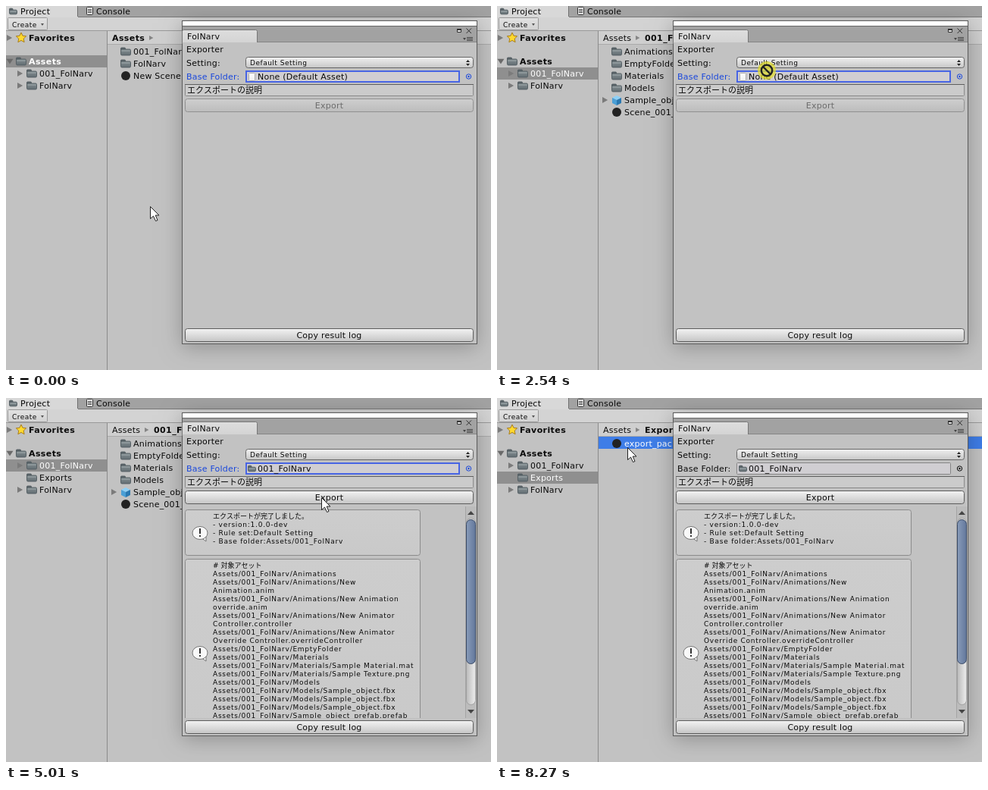
Animation, 640 px wide and 480 px high, one loop 9280 ms. Source, as an HTML page with a canvas:

```html
<!DOCTYPE html>
<html lang="en">
<head>
<meta charset="utf-8">
<style>
html, body { margin: 0; width: 640px; height: 480px; overflow: hidden; background: #c2c2c2; }
canvas { display: block; }
</style>
</head>
<body>
<canvas id="stage" width="640" height="480"></canvas>
<script>
const c = document.getElementById('stage').getContext('2d');
const LOOP = 9280;
const PACK = 'FolNarv', BASE = '001_' + PACK, ROOT = 'Assets/' + BASE + '/';
const FAMILY = '"DejaVu Sans", "Noto Sans CJK JP", sans-serif';
const INK = '#0a0a0a', BLUE = '#3e7de7', GREY = '#8f8f8f';

// Pointer moves: start, end, steps, target x, target y
const MOVES = [
  [300, 760, 7, 82, 78], [1010, 1240, 4, 82, 86], [1620, 1700, 2, 77, 86],
  [2006, 2540, 8, 356, 85], [2620, 2770, 3, 374, 92], [3540, 3850, 5, 416, 131],
  [5710, 5790, 2, 415, 142], [5940, 6790, 12, 77, 106], [7570, 7950, 6, 172, 65]
];
const PRESSES = [[1390, 1470], [1930, 3080], [4550, 4630], [7110, 7250], [8200, 8270]];

const SUMMARY = ['エクスポートが完了しました。', '- version:1.0.0-dev',
  '- Rule set:Default Setting', '- Base folder:Assets/' + BASE];
const ASSETS = ['# 対象アセット', ROOT + 'Animations', ROOT + 'Animations/New', 'Animation.anim',
  ROOT + 'Animations/New Animation', 'override.anim', ROOT + 'Animations/New Animator',
  'Controller.controller', ROOT + 'Animations/New Animator',
  'Override Controller.overrideController', ROOT + 'EmptyFolder', ROOT + 'Materials',
  ROOT + 'Materials/Sample Material.mat', ROOT + 'Materials/Sample Texture.png', ROOT + 'Models',
  ...Array(3).fill(ROOT + 'Models/Sample_object.fbx'), ROOT + 'Sample_object_prefab.prefab'];

const within = (t, a, b) => t >= a && t < b;

function pointer(t) {
  let x = 190, y = 264;
  for (const [start, end, steps, tx, ty] of MOVES) {
    if (t < start) break;
    const k = Math.min(steps, Math.floor((t - start) / (end - start) * (steps - 1) + 1.001)) / steps;
    const e = (1 - Math.cos(Math.PI * k)) / 2;
    x += (tx - x) * e;
    y += (ty - y) * e;
  }
  return [Math.round(x), Math.round(y)];
}

function rect(x, y, w, h, color) {
  c.fillStyle = color;
  c.fillRect(x, y, w, h);
}

function box(x, y, w, h, r, from, to, stroke, sideways = false) {
  const g = sideways ? c.createLinearGradient(x, 0, x + w, 0) : c.createLinearGradient(0, y, 0, y + h);
  g.addColorStop(0, from);
  g.addColorStop(1, to);
  c.beginPath();
  c.roundRect(x + .5, y + .5, w - 1, h - 1, r);
  c.fillStyle = g;
  c.fill();
  if (stroke) {
    c.strokeStyle = stroke;
    c.lineWidth = 1;
    c.stroke();
  }
}

function poly(points, color, stroke) {
  c.beginPath();
  for (let i = 0; i < points.length; i += 2) c.lineTo(points[i], points[i + 1]);
  c.closePath();
  c.fillStyle = color;
  c.fill();
  if (stroke) {
    c.strokeStyle = stroke;
    c.lineWidth = 1;
    c.stroke();
  }
}

function disc(x, y, r, color) {
  c.beginPath();
  c.arc(x, y, r, 0, 7);
  c.fillStyle = color;
  c.fill();
}

function ring(x, y, r, color, width) {
  c.beginPath();
  c.arc(x, y, r, 0, 7);
  c.strokeStyle = color;
  c.lineWidth = width;
  c.stroke();
}

function line(x1, y1, x2, y2, color, width = 1) {
  c.beginPath();
  c.moveTo(x1, y1);
  c.lineTo(x2, y2);
  c.strokeStyle = color;
  c.lineWidth = width;
  c.stroke();
}

function write(s, x, y, font, spacing, color, align = 'left') {
  c.font = font + ' ' + FAMILY;
  c.letterSpacing = (/[ぁ-ヿ]/.test(s) ? 0 : spacing) + 'px';
  c.textAlign = align;
  c.fillStyle = color;
  c.fillText(s, x, y);
}
const text = (s, x, y, color = INK, align) => write(s, x, y, '11px', .22, color, align);
const bold = (s, x, y, color = INK) => write(s, x, y, 'bold 11px', .4, color);
const small = (s, x, y, spacing = .5) => write(s, x, y, '9px', spacing, INK);

const right = (x, y, s = 4, color = '#7b7b7b') => poly([x, y - s, x + s * 1.8, y, x, y + s], color);
const down = (x, y, s, color) => poly([x - s, y - s / 2, x + s, y - s / 2, x, y + s], color);

function folder(x, y, w = 14) {
  const h = w * .78;
  box(x, y - h / 2, w * .5, h * .6, 1, '#566065', '#566065', '#566065');
  box(x, y - h / 2 + 2, w, h - 2, 1.5, '#879195', '#606b70', '#566065');
  line(x + 1.5, y - h / 2 + 4.5, x + w - 1.5, y - h / 2 + 4.5, '#9da7aa');
}

function star(x, y) {
  const pts = [];
  for (let i = 0; i < 10; i++) {
    const r = i % 2 ? 3.4 : 7, a = i * Math.PI / 5;
    pts.push(x + r * Math.sin(a), y - r * Math.cos(a));
  }
  poly(pts, '#ffd92e', '#a97d1c');
}

function cube(x, y) {
  poly([x, y - 6, x + 6, y - 3, x, y, x - 6, y - 3], '#8fd0f5');
  poly([x - 6, y - 3, x, y, x, y + 7, x - 6, y + 4], '#4a9fd6');
  poly([x + 6, y - 3, x, y, x, y + 7, x + 6, y + 4], '#2b78b0');
}

function button(y, label, enabled, pressed) {
  const [top, bottom] = pressed ? ['#9b9b9b', '#b4b4b4'] : enabled ? ['#f4f4f4', '#c4c4c4'] : ['#cfcfcf', '#bcbcbc'];
  box(236, y, 381, 18, 3, top, bottom, enabled ? '#5c5c5c' : '#919191');
  text(label, 426.5, y + 13, enabled ? INK : '#6c6c6c', 'center');
}

function drawTree(t) {
  const exported = t >= 5010;
  const rows = ['Assets', BASE, ...(exported ? ['Exports'] : []), PACK];
  const selected = t < 1390 ? 0 : t < 7110 ? 1 : 2;
  const active = within(t, 1390, 2310) || within(t, 7110, 8200);
  right(1, 42);
  star(20, 42);
  bold('Favorites', 30, 46);
  rows.forEach((name, i) => {
    const y = 73 + i * 16, color = i === selected ? '#fff' : INK;
    if (i === selected) rect(0, y - 8, 133, 16, active ? BLUE : GREY);
    if (i === 0) {
      down(5, y - 1, 4.5, '#6a6a6a');
      folder(13, y);
      bold(name, 30, y + 4, color);
    } else {
      if (name !== 'Exports') right(15, y);
      folder(27, y);
      text(name, 44, y + 4, color);
    }
  });
}

function drawList(t) {
  const place = t < 1470 ? '' : t < 7190 ? BASE : 'Exports';
  (place ? text : bold)('Assets', 140, 46);
  right(place ? 183 : 189, 42, 3, '#858585');
  if (place) bold(place, 195, 46);

  const picked = t >= 8200;
  if (picked) rect(134, 51, 506, 16, BLUE);
  const rows = !place ? [BASE, PACK, 'New Scene']
    : place === BASE ? ['Animations', 'EmptyFolder', 'Materials', 'Models', 'Sample_object', 'Scene_' + BASE]
    : ['export_package'];
  rows.forEach((name, i) => {
    const y = 60 + i * 16;
    if (name === 'Sample_object') {
      right(139, y);
      cube(158, y);
    } else if (/Scene|export/.test(name)) disc(158, y, 6, '#222');
    else folder(151, y);
    text(name, 168, y + 4, picked ? '#fff' : INK);
  });
}

function drawProject(t) {
  rect(0, 0, 640, 480, '#c2c2c2');
  rect(0, 0, 640, 15, '#a2a2a2');
  rect(0, 0, 95, 15, '#d8d8d8');
  rect(94, 0, 1, 14, '#707070');
  rect(95, 14, 545, 1, '#777');
  folder(4, 7, 11);
  text('Project', 19, 11);
  box(106, 1, 9, 11, 1, '#eee', '#ddd', '#333');
  for (const y of [4, 6, 8]) rect(108, y, 5, 1, '#444');
  text('Console', 119, 11);

  rect(0, 15, 640, 17, '#d3d3d3');
  rect(0, 32, 640, 1, '#999');
  box(2, 15, 53, 17, 1, '#e2e2e2', '#d2d2d2', '#999');
  small('Create', 8, 28);
  down(48, 24, 2, '#555');
  rect(134, 33, 506, 18, '#cfcfcf');
  rect(134, 50, 506, 1, '#aaa');
  drawTree(t);
  drawList(t);
  rect(133, 33, 1, 447, '#8b8b8b');
}

function bubble(x, y) {
  poly([x + 1, y + 6, x + 8, y + 4, x + 8, y + 11], '#f5f5f5', '#777');
  c.beginPath();
  c.ellipse(x, y, 10, 8.5, 0, 0, 7);
  c.fillStyle = '#f8f8f8';
  c.fill();
  c.strokeStyle = '#777';
  c.stroke();
  rect(x - 1, y - 6, 2, 7, '#333');
  rect(x - 1, y + 3, 2, 2, '#333');
}

function drawLog() {
  c.save();
  c.beginPath();
  c.rect(233, 143, 388, 279);
  c.clip();
  box(236, 147, 311, 61, 3, '#cdcdcd', '#c9c9c9', '#8b8b8b');
  box(236, 212, 311, 250, 3, '#cdcdcd', '#c9c9c9', '#8b8b8b');
  SUMMARY.forEach((s, i) => small(s, 273, 159 + i * 11, .75));
  ASSETS.forEach((s, i) => small(s, 273, 224 + i * 11, .75));
  bubble(256, 178);
  bubble(256, 336);
  rect(606, 143, 15, 279, '#bcbcbc');
  rect(606, 143, 1, 279, '#a5a5a5');
  box(607, 158, 13, 247, 6, '#b8b8b8', '#f0f0f0', '#a0a0a0', true);
  box(607, 160, 13, 191, 6, '#8a9dbb', '#61769a', '#3a4a66', true);
  poly([609, 154, 618, 154, 613.5, 149], '#444');
  poly([609, 411, 618, 411, 613.5, 416], '#444');
  c.restore();
}

function drawWindow(t) {
  const focused = t < 1470 || within(t, 2310, 7190), filled = t >= 3080;
  const accent = focused ? '#1947dc' : INK;
  c.save();
  c.shadowColor = 'rgba(0,0,0,.26)';
  c.shadowBlur = 26;
  c.shadowOffsetY = 4;
  rect(232, 19, 390, 427, '#5a5a5a');
  c.restore();
  rect(233, 20, 388, 6, '#fff');
  rect(233, 26, 388, 1, '#666');
  rect(233, 27, 388, 21, '#a2a2a2');
  rect(233, 48, 388, 397, '#c2c2c2');
  rect(331, 47, 290, 1, '#858585');
  box(232, 31, 100, 20, 2, '#dedede', '#d2d2d2', '#777');
  rect(233, 48, 388, 4, '#c2c2c2');
  text(PACK, 239, 44);
  box(595, 30, 6, 5, 0, '#ddd', '#ddd', '#333');
  rect(595, 30, 6, 2, '#333');
  line(607.5, 29.5, 614, 36, '#333');
  line(614, 29.5, 607.5, 36, '#333');
  down(605, 43, 2, '#444');
  for (const y of [41, 43, 45]) rect(608, y, 8, 1, '#444');

  text('Exporter', 238, 61);
  text('Setting:', 238, 79);
  box(316, 67, 301, 15, 3, '#f2f2f2', '#c6c6c6', '#666');
  small('Default Setting', 322, 78);
  poly([607, 74, 612, 74, 609.5, 71], '#222');
  poly([607, 76, 612, 76, 609.5, 79], '#222');

  text('Base Folder:', 238, 97, accent);
  box(316, 85, 283, 16, 1, '#d0ced2', '#d0ced2', '#858585');
  if (focused) {
    c.strokeStyle = '#4865e4';
    c.lineWidth = 2;
    c.strokeRect(317, 86, 281, 14);
  }
  if (filled) folder(319, 93, 11);
  else box(320, 88, 9, 11, 1, '#fff', '#eee', '#aaa');
  text(filled ? BASE : 'None (Default Asset)', 332, 97);
  ring(610.5, 93, 3.2, accent, 1);
  disc(610.5, 93, 1.2, accent);

  box(236, 103, 381, 16, 1, '#cbcbcb', '#cbcbcb', '#8a8a8a');
  rect(236, 103, 381, 1, '#5e5e5e');
  text('エクスポートの説明', 239, 115);
  button(122, 'Export', filled, within(t, 4550, 4630));
  if (t >= 4950) drawLog();
  button(425, 'Copy result log', true);
}

function drawPointer(t) {
  const [x, y] = pointer(t);
  if (PRESSES.some(([a, b]) => within(t, a, b))) disc(x, y, 12, 'rgba(226,222,40,.72)');
  if (within(t, 2006, 2620) && x > 134) {
    ring(x, y, 7.2, '#222', 2.4);
    line(x - 5, y - 5, x + 5, y + 5, '#222', 2.4);
    return;
  }
  const shape = [0, 0, 0, 16, 4, 12.5, 7, 19, 9.5, 18, 6.7, 11.5, 11.5, 11.5];
  poly(shape.map((v, i) => v + .5 + (i % 2 ? y : x)), '#fff', '#222');
}

function frame(now) {
  const t = now % LOOP;
  drawProject(t);
  drawWindow(t);
  drawPointer(t);
  requestAnimationFrame(frame);
}
requestAnimationFrame(frame);
</script>
</body>
</html>
```
